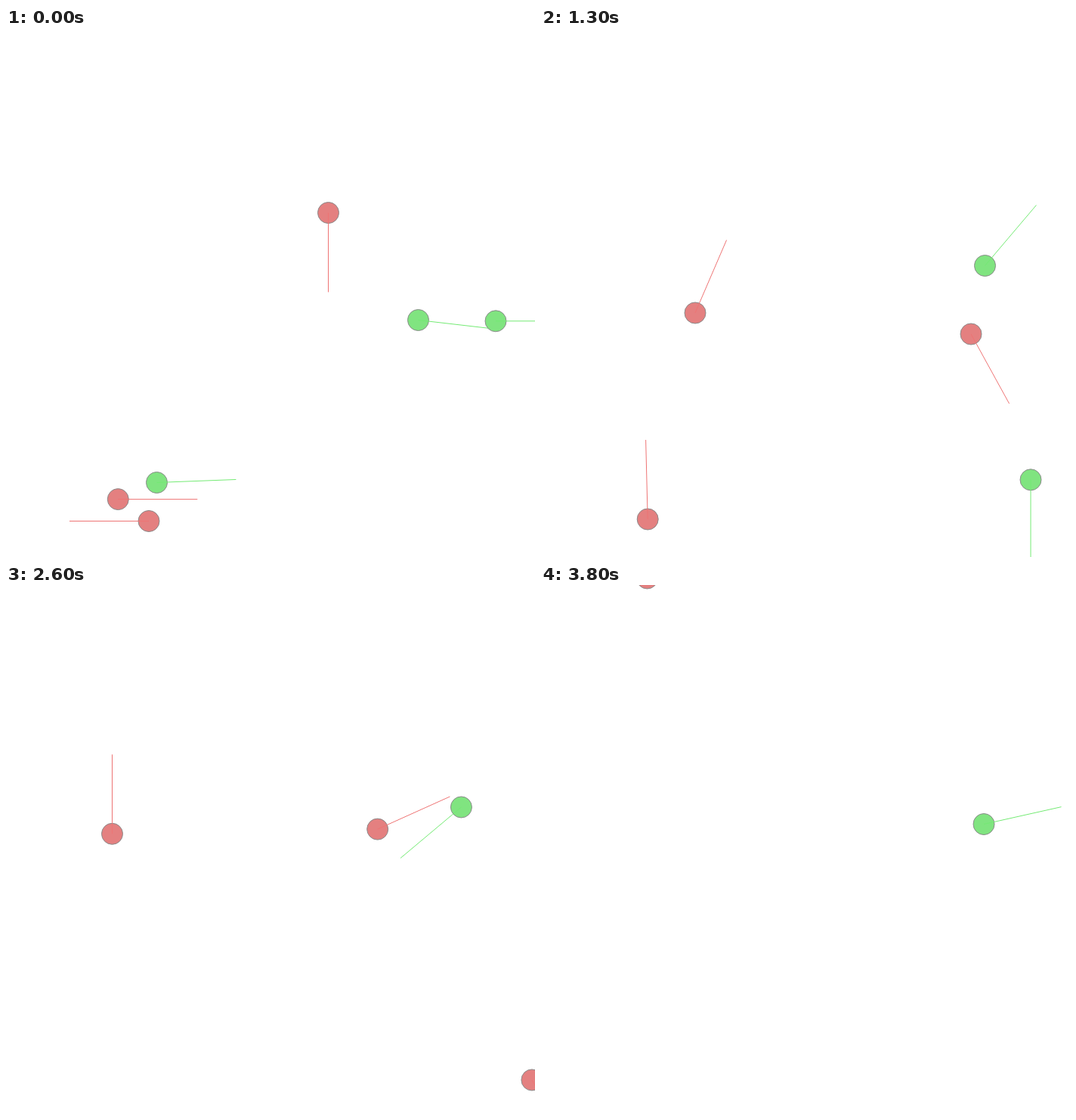
These frames come from a looping animation (700 by 700 pixels, 3900 ms). An HTML page with a canvas:

```html
<!DOCTYPE html>
<html lang="en">
<head>
<meta charset="utf-8">
<title>Moving agents</title>
<style>
html, body { margin: 0; height: 100%; overflow: hidden; background: #fff; }
canvas { display: block; }
</style>
</head>
<body>
<canvas id="stage" width="700" height="700"></canvas>
<script>
const ctx = document.getElementById('stage').getContext('2d');
const LOOP = 39, STEP_MS = 100, RADIUS = 14, HEADING = 105, WALK = 17.5;
const RED = { fill: '#e48080', line: '#ee7474' };
const GREEN = { fill: '#80e480', line: '#74ea74' };

const radians = degrees => degrees * Math.PI / 180;

// Turns to face down after the first step, then walks at constant speed
const walkDown = (x, y, heading) => step => ({
  x,
  y: y + WALK * Math.max(0, step - 1),
  angle: radians(step < 1 ? heading : 90)
});

// Starts at rest and steers through key points: [step, x, y, heading in degrees]
function steer(...points) {
  const legSpeed = i => {
    const [a, b] = [points[i], points[i + 1]];
    return Math.hypot(b[1] - a[1], b[2] - a[2]) / (b[0] - a[0]);
  };
  const last = points.length - 1;
  const knots = points.map(([step, x, y, heading], i) => {
    const angle = radians(heading);
    const speed = i === 0 ? 0 : (legSpeed(i - 1) + legSpeed(Math.min(i, last - 1))) / 2;
    return { step, x, y, angle, vx: speed * Math.cos(angle), vy: speed * Math.sin(angle) };
  });

  return step => {
    if (step > knots[last].step) return null;
    const i = Math.max(1, knots.findIndex(knot => knot.step >= step));
    const a = knots[i - 1], b = knots[i];
    const span = b.step - a.step, u = (step - a.step) / span, v = 1 - u;
    const hermite = (from, to, slopeA, slopeB) =>
      from * v * v * (1 + 2 * u) + to * u * u * (3 - 2 * u) +
      span * u * v * (v * slopeA - u * slopeB);
    // Near reversals flip at half way, smaller turns are gradual
    const reverses = Math.abs(b.angle - a.angle) > radians(120);
    const turn = reverses ? Math.round(u) : u;
    return {
      x: hermite(a.x, b.x, a.vx, b.vx),
      y: hermite(a.y, b.y, a.vy, b.vy),
      angle: a.angle + (b.angle - a.angle) * turn
    };
  };
}

const agents = [
  { color: GREEN, poseAt: steer(
    [0, 545.5, 386.5, 6.6], [8, 582.5, 354.5, -65.4], [13, 587.5, 314.5, -49.7],
    [18, 612, 289, -36.5], [22, 612.5, 288, 135], [30, 590.5, 300.5, 145], [38, 586, 316.5, -12.6]) },
  { color: GREEN, poseAt: walkDown(648, 387.8, 0) },
  { color: GREEN, poseAt: walkDown(199.5, 601.5, -2.2) },
  { color: RED, poseAt: steer(
    [0, 426.5, 244.5, 90], [8, 484, 354.5, 18.2], [13, 569, 405, 61.2],
    [18, 591, 521.5, 84.8], [22, 639, 583.5, 30.7], [28, 712, 700, 75]) },
  { color: RED, poseAt: steer(
    [0, 148.3, 623.6, 0], [8, 168.5, 476.5, -85.3], [13, 204, 377, -66.7],
    [18, 298.5, 333, -11], [22, 401, 323.5, -3], [30, 565, 295.5, -45.5]) },
  { color: RED, poseAt: steer(
    [0, 189, 652.5, 180], [8, 145, 690.5, 115], [13, 141.2, 650, 268.6],
    [22, 140.5, 436, 270], [38, 140.5, -9, 270]) }
];

function drawAgent({ color, poseAt }, step) {
  const pose = poseAt(step);
  if (!pose) return;
  const { x, y, angle } = pose;
  ctx.beginPath();
  ctx.arc(x, y, RADIUS, 0, 2 * Math.PI);
  ctx.fillStyle = color.fill;
  ctx.fill();
  ctx.strokeStyle = '#8a8a8a';
  ctx.stroke();
  ctx.beginPath();
  ctx.moveTo(x, y);
  ctx.lineTo(x + HEADING * Math.cos(angle), y + HEADING * Math.sin(angle));
  ctx.strokeStyle = color.line;
  ctx.stroke();
}

const start = performance.now();
function render() {
  const step = Math.floor((performance.now() - start) / STEP_MS) % LOOP;
  ctx.clearRect(0, 0, 700, 700);
  agents.forEach(agent => drawAgent(agent, step));
  requestAnimationFrame(render);
}
render();
</script>
</body>
</html>
```
